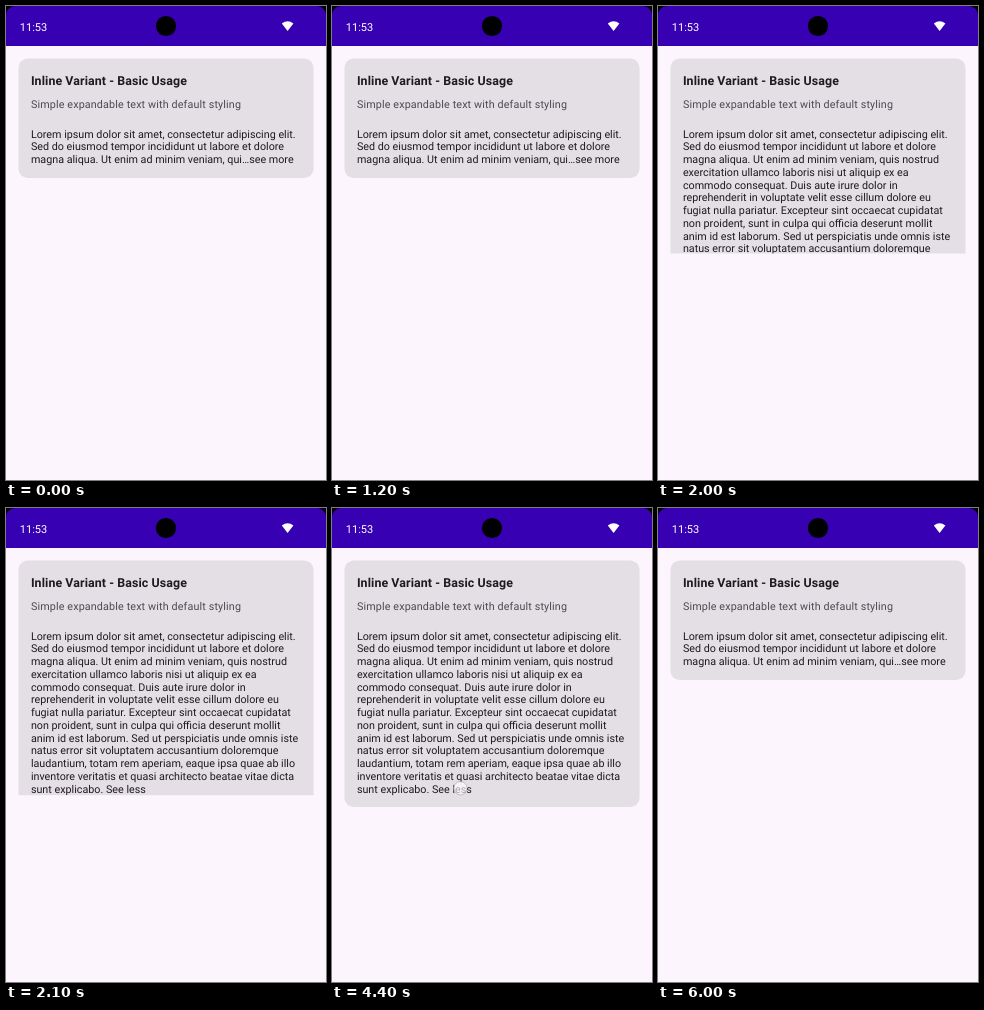
Recreate the animation shown at these times as an HTML page. Size 320 px wide and 474 px high, loop 6.9 s.

```html
<!DOCTYPE html>
<html lang="en">
<head>
<meta charset="utf-8">
<title>Expandable text</title>
<style>
  html, body { margin: 0; width: 100%; height: 100%; overflow: hidden; background: #fcf5fd; }
  svg { display: block; width: 100%; height: 100%; }
  text { font-family: Roboto, sans-serif; text-rendering: geometricPrecision; fill: #1d1b20; }
  .clock { font-size: 11px; fill: #fff; }
  .title { font-size: 12.4px; font-weight: 700; letter-spacing: .09px; }
  .subtitle { font-size: 10.76px; letter-spacing: .14px; fill: #4d4a52; }
  #body text { font-size: 10.76px; }
  #touch { fill: #fff; fill-opacity: .62; stroke: #98939b; stroke-opacity: .55; stroke-width: .9; }
</style>
</head>
<body>
<svg viewBox="0 0 320 474">
  <defs>
    <clipPath id="reveal"><rect id="window" width="320" height="172"/></clipPath>
  </defs>
  <rect width="320" height="474" fill="#fcf5fd"/>
  <rect width="320" height="40" fill="#3700b3"/>
  <path d="M0 0H9A9 9 0 0 0 0 9ZM320 0H311A9 9 0 0 1 320 9Z"/>
  <circle cx="160" cy="20" r="10.1"/>
  <text class="clock" x="13.8" y="24.6">11:53</text>
  <path d="M275.8 17.5Q281.6 13 287.4 17.5L281.6 24.9Z" fill="#fff"/>
  <g clip-path="url(#reveal)">
    <rect id="card" x="12.45" y="52.6" width="295.1" rx="9.33" fill="#e4dee5"/>
    <text class="title" x="24.9" y="79">Inline Variant - Basic Usage</text>
    <text class="subtitle" x="24.9" y="101.8">Simple expandable text with default styling</text>
    <g id="body"></g>
  </g>
  <circle id="touch" r="6.7"/>
</svg>
<script>
const LOOP = 6900, STEP = 100;
const EXPAND = 1900, COLLAPSE = 4500, SETTLED = 4600;
const TOP = 52.6, SHORT = 172, TALL = 299;
const TAPS = [
  { from: 1800, to: 2000, x: 259, y: 155 },
  { from: 4400, to: 4600, x: 128.4, y: 280.2 }
];
const LINES = [
  'Lorem ipsum dolor sit amet, consectetur adipiscing elit.',
  'Sed do eiusmod tempor incididunt ut labore et dolore',
  'magna aliqua. Ut enim ad minim veniam, quis nostrud',
  'exercitation ullamco laboris nisi ut aliquip ex ea',
  'commodo consequat. Duis aute irure dolor in',
  'reprehenderit in voluptate velit esse cillum dolore eu',
  'fugiat nulla pariatur. Excepteur sint occaecat cupidatat',
  'non proident, sunt in culpa qui officia deserunt mollit',
  'anim id est laborum. Sed ut perspiciatis unde omnis iste',
  'natus error sit voluptatem accusantium doloremque',
  'laudantium, totam rem aperiam, eaque ipsa quae ab illo',
  'inventore veritatis et quasi architecto beatae vitae dicta',
  'sunt explicabo. See less'
];
const TRUNCATED = 'magna aliqua. Ut enim ad minim veniam, qui…see more';

const $ = id => document.getElementById(id);
const [body, card, reveal, touch] = ['body', 'card', 'window', 'touch'].map($);
body.innerHTML = LINES.map((line, i) =>
  `<text x="24.9" y="${131.7 + i * 12.74}">${line}</text>`).join('');
const rows = [...body.children];

// Critically damped spring, stiffness 400.
function cardBottom(seconds) {
  const w = 20 * seconds;
  return TALL - (TALL - SHORT) * (1 + w) * Math.exp(-w);
}

function render(t) {
  const open = t >= EXPAND && t < COLLAPSE;
  const full = t >= EXPAND && t < SETTLED;
  card.setAttribute('height', (open ? TALL : SHORT) - TOP);
  reveal.setAttribute('height', open ? cardBottom((t - EXPAND) / 1000) : SHORT);
  rows[2].textContent = full ? LINES[2] : TRUNCATED;
  rows.forEach((row, i) => row.setAttribute('visibility', open || i < 3 ? 'visible' : 'hidden'));

  const tap = TAPS.find(p => t >= p.from && t < p.to);
  touch.setAttribute('visibility', tap ? 'visible' : 'hidden');
  if (tap) {
    touch.setAttribute('cx', tap.x);
    touch.setAttribute('cy', tap.y);
  }
}

const start = performance.now();
function frame() {
  const t = (performance.now() - start) % LOOP;
  render(Math.floor(t / STEP) * STEP);
  requestAnimationFrame(frame);
}
frame();
</script>
</body>
</html>
```
